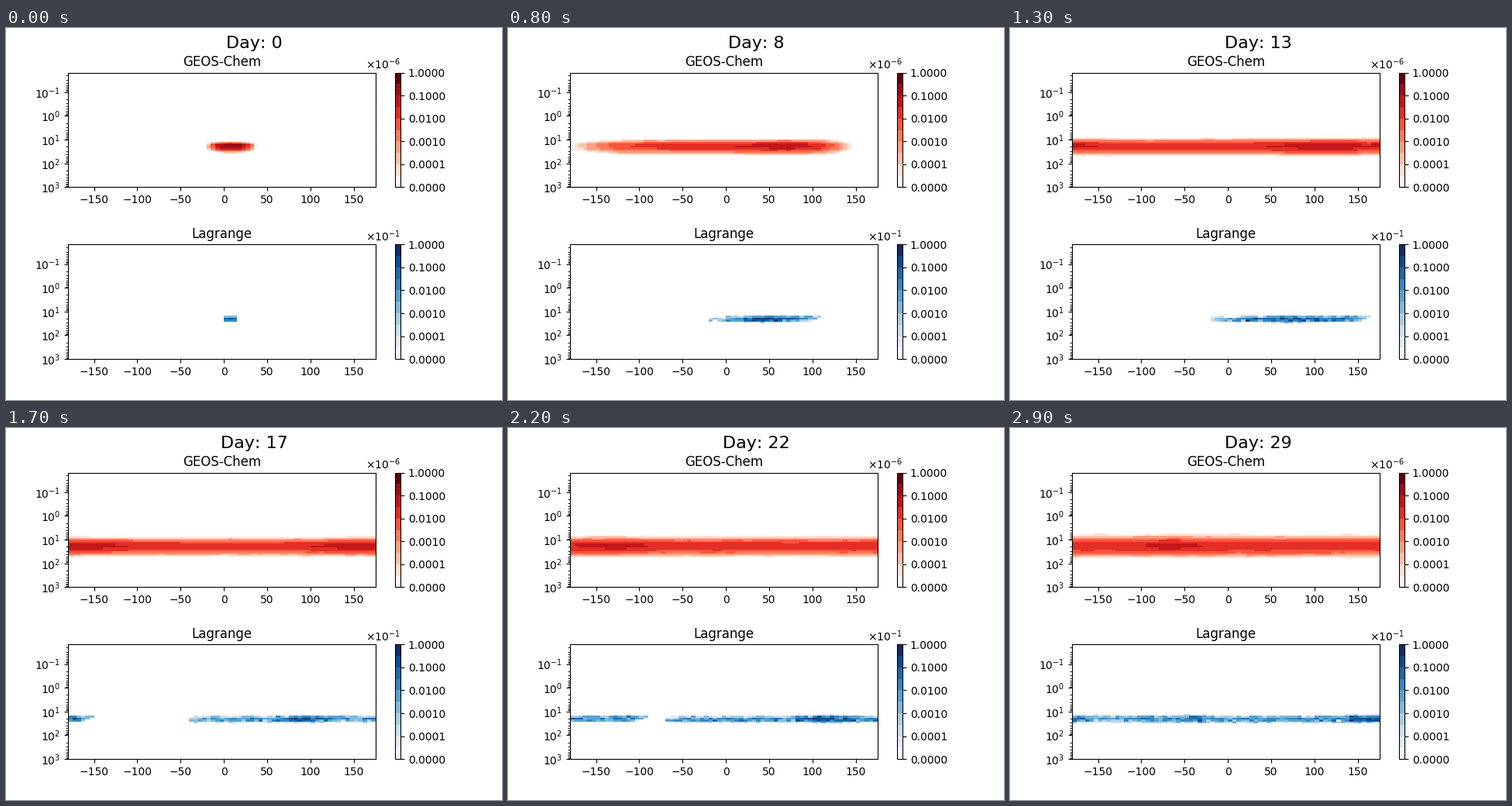
Recreate the animation shown at these times as a matplotlib script. Size 640 by 480 pixels, loop 3000 ms.

```python
import numpy as np
import matplotlib.pyplot as plt
from matplotlib.animation import FuncAnimation

plt.rcParams["text.kerning_factor"] = 6

N_DAYS = 30
CORE = 6

lon_edges = np.arange(-180, 176, 5)
lon = lon_edges[:-1] + 2.5
# Pressure levels (hPa) around the plume, slowly narrowing downwards
step = np.arange(-8, 10)
p_edges = 21.76 * 10 ** (0.0793 * step - 0.00072 * step ** 2)
rows = step[:-1] + 7

rng = np.random.RandomState(4)
WAVES = (2, 5, 9, 14)
phases = rng.uniform(0, 2 * np.pi, (len(rows), len(WAVES)))
grain = rng.normal(size=(2, len(rows), 72))


def bell(x, center, width):
    return np.exp(-((x - center) / width) ** 2 / 2)


def fade(dist, scale):
    return np.exp(-np.clip(dist, 0, None) / scale)


def ripple(day):
    """Smooth waves drifting east, one set per row."""
    x = np.radians(lon - 9 * day)
    out = np.zeros((len(rows), len(lon)))
    for k, n in enumerate(WAVES):
        out += np.sin(n * x + phases[:, k, None] + 0.15 * k * day) / (1 + 0.3 * k)
    return out / 2


def wrap_around(level, left, right, turns):
    """Strongest value of a plume that may circle the globe."""
    best = np.full(len(lon), -9.0)
    for turn in turns:
        x = lon + 360 * turn
        inside = (x > left) & (x < right)
        best = np.maximum(best, np.where(inside, level(x), -9))
    return best


def chem_profile(day):
    """Strength along longitude, in colour steps."""
    top = 6.7 + 2.4 * np.exp(-day / 3)
    left, right = -21 - 20 * day, 38 + 13.5 * day
    s_left, s_right = 9 + 3 * min(day, 10), 9 + 1.4 * min(day, 14)

    def level(x):
        return top * (1 - fade(x - left, s_left) - fade(right - x, s_right))

    surge = bell(day, 13, 4.5)
    dist = (lon - 7 - 10 * day + 180) % 360 - 180
    peak = (0.65 + 0.65 * surge) * bell(dist, 0, 29 + 25 * surge)
    return wrap_around(level, left, right, (-1, 0, 1)) + peak


def chem_field(day):
    age = day / (N_DAYS - 1)
    up, down = 1.6 + 3 * age ** 0.75, 2.6 + 2.8 * age ** 0.6
    d = (rows - 5.6)[:, None]
    drop = 4 * (d / np.where(d < 0, up, down)) ** 2
    noise = (0.04 + 0.07 * np.abs(d)) * min(day / 8, 1) * ripple(day)
    return np.ma.masked_less(chem_profile(day) - drop + noise, 0)


def lagrange_row(i, day):
    r = rows[i]
    grow = min(day / 8, 1)
    left = -18 * grow - 6 * max(day - 13, 0)
    right = 15 + 11.3 * day + 5 * (CORE - r) * grow
    span = right - left
    edge = min(14, span / 6)
    squeeze = 2.6 - 1.2 * np.sqrt(day / (N_DAYS - 1))
    base = 6.1 - squeeze * (r - CORE - 0.2) ** 2

    def level(x):
        tilt = 1.5 * (CORE - r) * ((x - left) / span - 0.6) * grow
        bump = 2.7 * bell(x, 5 + 5.2 * day, 22) + 1.4 * grow * bell(x, right - 20, 16)
        ends = 3 * fade(x - left, edge) + 1.8 * fade(right - x, edge)
        return base + tilt + bump - ends

    mix = np.cos(0.6 * day) * grain[0, i] + np.sin(0.6 * day) * grain[1, i]
    mix = np.roll(mix, round(1.3 * day))[:len(lon)]
    return wrap_around(level, left, right, (0, 1)) + mix * (0.3 + 0.8 * grow)


def lagrange_field(day):
    level = np.array([lagrange_row(i, day) for i in range(len(rows))])
    return np.ma.masked_less(level, 1)


def make_panel(ax, name, cmap, power, field):
    mesh = ax.pcolormesh(lon_edges, p_edges, field(0), vmin=0, vmax=10,
                         cmap=plt.get_cmap(cmap, 10))
    ax.set_yscale("log")
    ax.set_xlim(-180, 175)
    ax.set_ylim(1005.65, 0.015)
    ax.set_title(name)
    bar = fig.colorbar(mesh, ax=ax, ticks=range(0, 11, 2))
    bar.set_ticklabels([f"{10.0 ** e:.4f}" for e in range(-5, 1)])
    bar.ax.minorticks_off()
    bar.ax.annotate(rf"$\times\mathdefault{{10^{{{power}}}}}$", (1, 1), (0, 3),
                    xycoords="axes fraction", textcoords="offset points",
                    ha="right", va="baseline")
    return mesh


fig, axes = plt.subplots(2, 1, figsize=(6.4, 4.8), dpi=100, gridspec_kw={"hspace": 0.5})
title = fig.suptitle("Day: 0", fontsize=16)
chem = make_panel(axes[0], "GEOS-Chem", "Reds", -6, chem_field)
lagrange = make_panel(axes[1], "Lagrange", "Blues", -1, lagrange_field)


def draw(day):
    title.set_text(f"Day: {day}")
    chem.set_array(chem_field(day))
    lagrange.set_array(lagrange_field(day))
    return title, chem, lagrange


anim = FuncAnimation(fig, draw, frames=N_DAYS, interval=100, repeat=True, repeat_delay=0)
plt.show()
```
